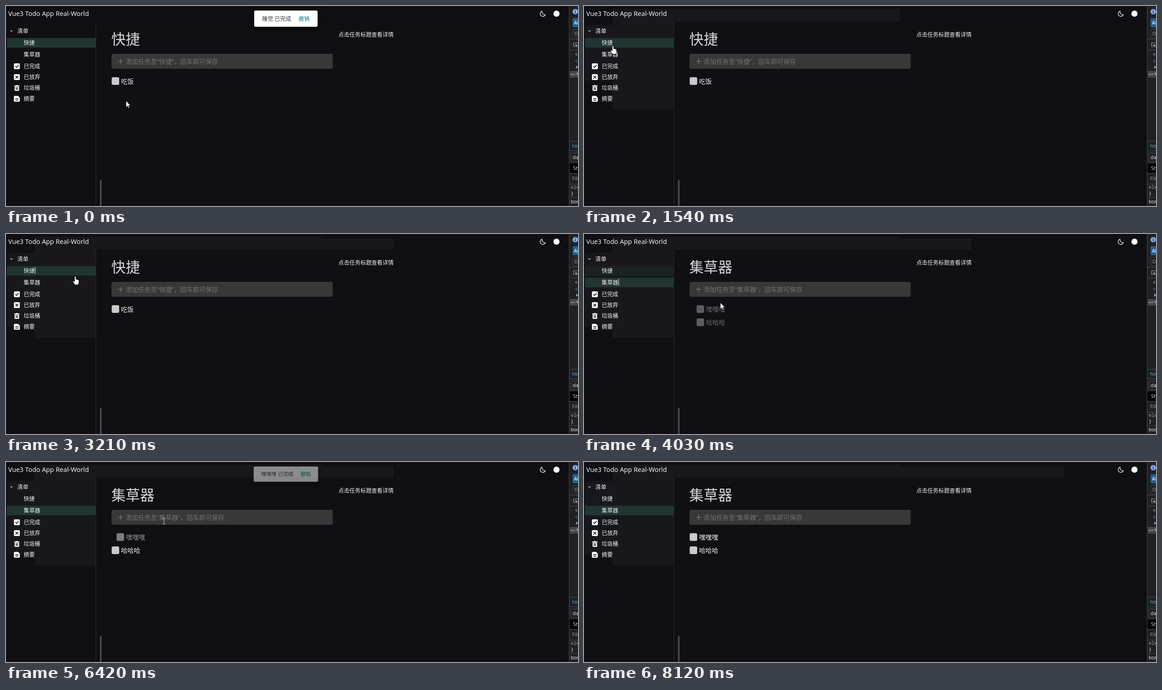
An HTML page that plays this animation: 1263 px wide and 443 px high, repeating every 8.22 s.

```html
<!DOCTYPE html>
<html lang="zh-CN">
<head>
<meta charset="utf-8">
<title>Todo App</title>
<style>
  html, body { margin: 0; width: 100%; height: 100%; overflow: hidden; background: #101014; }
  svg { display: block; width: 1263px; height: 443px; }
  text { font: 12.2px "Open Sans", "Noto Sans CJK SC", "Noto Sans CJK", sans-serif; fill: #f2f2f2; white-space: pre; }
  .brand { font-size: 14.4px; font-weight: 500; fill: #fff; }
  .title { font-size: 31.7px; fill: #d8d8d9; }
  .hint { font-size: 13.9px; fill: #727272; }
  .task text { font-size: 14.1px; }
  .task rect { fill: #cacaca; }
  .tone { fill: #18181c; }
  .sel { fill: #213632; }
  .toast text { fill: #3a3c40; }
  .toast .undo { fill: #0b7f80; }
  .toast rect { fill: #fff; filter: drop-shadow(0 5px 7px rgba(0, 0, 0, .5)); }
  .icon { fill: #fff; }
  .cut { fill: none; stroke: #101014; stroke-width: 1.6; }
  .tools text { font-size: 11px; fill: #e8eaed; }
  .tools .mono { font: 10.5px "Noto Sans Mono", "DejaVu Sans Mono", monospace; }
  .tools .blue { fill: #5db0d7; }
  .tools .gray { fill: #9aa0a6; }
  .rule { stroke: #494c50; fill: none; }
  .pointer { fill: #fff; stroke: #000; stroke-width: .8; stroke-linejoin: round; }
</style>
</head>
<body>
<svg viewBox="0 0 1263 443">
  <rect width="1263" height="443" fill="#101014"/>
  <!-- lighter panels, each shown from a given beat -->
  <path class="tone" data-from="3" d="M63 6H698V34H198V230H63z"/>
  <path class="tone" data-from="6" d="M2 42H63V165H2z"/>
  <path class="tone" data-from="15" d="M2 165H63V204H2z"/>
  <path class="tone" data-from="20" d="M698 10H856V34H698z"/>
  <path class="tone" data-from="52" d="M856 10H1061V34H856z"/>
  <path d="M198.500 34V443" stroke="#2b2b2e"/>
  <rect x="207.5" y="385" width="3.5" height="70" rx="1.7" fill="#4b4b4d"/>

  <g id="rows"></g>
  <text class="brand" x="5" y="22">Vue3 Todo App Real-World</text>
  <path d="M8.500 54h7l-3.500 4z" fill="#8a8a8c"/>
  <text x="25" y="59.6">清单</text>
  <path id="caret" stroke="#fff"/>

  <g class="icon">
    <rect x="17.5" y="127" width="13" height="13" rx="2"/>
    <rect x="17.5" y="151" width="13" height="13" rx="2"/>
    <path d="M18 176h3.500l1-1h3l1 1H30v1.800H18zM19 178.500h10v8q0 1.500-1.500 1.500h-7q-1.500 0-1.500-1.500z"/>
    <path d="M19.500 199h7l4 4v7.500q0 1.500-1.500 1.500h-10q-1.500 0-1.500-1.500v-9.500q0-2 2-2z"/>
  </g>
  <path class="cut" d="M20.500 133.500l2.600 2.600 4.700-5M21 154.500l6 6m0-6l-6 6M22.500 180v6m3-6v6M20.500 205h7M20.500 208.500h7"/>

  <path d="M1183.500 11.300A6 6 0 1 0 1191 19.300A7 7 0 0 1 1183.500 11.300z" fill="none" stroke="#f2f2f2" stroke-width="1.3"/>
  <circle cx="1215.5" cy="17" r="6.8" fill="#fff"/>

  <text class="title" id="title" x="232.5" y="84.8"></text>
  <rect x="233" y="106" width="488.5" height="33" rx="4" fill="#383838"/>
  <path d="M247.500 122.500h11m-5.500-5.500v11" stroke="#858585" stroke-width="1.2"/>
  <text class="hint" id="hint" x="264" y="128"></text>
  <text x="734" y="67.800">点击任务标题查看详情</text>

  <g id="tasks"></g>

  <g class="toast" id="toast">
    <rect id="card" y="10" height="36" rx="3"/>
    <text id="msg" y="32.7"></text>
    <text class="undo" id="undo" y="32.7">撤销</text>
  </g>

  <g class="tools">
    <rect x="1244" width="19" height="443" fill="#202124"/>
    <rect x="1244" y="348" width="19" height="22" fill="#000"/>
    <rect x="1245" y="144" width="18" height="14.5" fill="#46484b"/>
    <path class="rule" d="M1243.500 0V443M1244 73.500h19m-19 24h19m-19 202h19m-19 21h19m-19 27h19m-19 23h19m-19 24h19m-19 30h19"/>
    <circle cx="1257" cy="12.5" r="6" fill="#7cacf8"/>
    <path d="M1257 11.500v4.500m0-7.500v1.500" stroke="#202124" stroke-width="1.6"/>
    <rect x="1251" y="27" width="30" height="20" rx="3" fill="#1a639b"/>
    <text x="1254" y="41" style="font-weight:600">All</text>
    <rect class="rule" x="1251.5" y="51.5" width="30" height="19" rx="3"/>
    <text class="gray" x="1255" y="65">Default</text>
    <path d="M1256 90h-2.500v-8.500h10" fill="none" stroke="#9aa0a6" stroke-width="1.2"/>
    <path d="M1257 84.500l6 2.500-2.500 1 2 3-1.200.8-2-3-2 2z" fill="#9aa0a6"/>
    <text class="mono" x="1256" y="111">&lt;!DOCTYPE html&gt;</text>
    <text class="mono blue" x="1256" y="126">&lt;html&gt;</text>
    <path d="M1259 132l4.500 3.500-4.500 3.500zM1258.500 148.500h7l-3.500 5z" fill="#9aa0a6"/>
    <path d="M1247 151.500h9" stroke="#c4c7ca" stroke-width="1.8" stroke-dasharray="1.8"/>
    <text class="blue" x="1250" y="314">html</text>
    <rect class="rule" x="1247.5" y="325.5" width="30" height="19" rx="2"/>
    <text x="1251" y="338.5">dark</text>
    <text x="1252" y="363">Styles</text>
    <text class="gray" x="1250" y="386">Filter</text>
    <text class="mono gray" x="1247" y="405">element.style {</text>
    <text class="mono" x="1247" y="419">}</text>
    <text class="mono" x="1247" y="437">body {</text>
  </g>

  <g id="cursor">
    <path class="pointer" id="arrow" d="M0 0V14.500L3.400 11.300 5.700 16.400 7.800 15.500 5.600 10.500H10z"/>
    <path class="pointer" id="hand" d="M-1.600 1.500Q-1.600 0 0 0T1.600 1.500V6.500Q3.600 5.600 4.200 7.200Q6 6.600 6.400 8Q8 7.600 8 9.500V13Q8 16 6 18.500H-1Q-2 16.500-4.600 13Q-6 10.800-4.500 10Q-3.200 9.600-1.600 11.500z"/>
    <path id="beam" d="M-3-6.500H-1L0-5.500 1-6.500H3M0-5.500V5.500M-3 6.500H-1L0 5.500 1 6.500H3" fill="none" stroke="#d0d0d0"/>
  </g>
</svg>
<script>
// The screen refreshes once per beat; all times below are in beats.
const LOOP = 8220, BEATS = 59, BEAT = LOOP / BEATS;
const SWITCH = 28, TASK_FADE = 2.4, TOAST_FADE = 1.7, BLINK = 4;

const LISTS = [
  { name: "快捷", start: -9, focus: 12, blur: SWITCH },
  { name: "集草器", start: SWITCH, focus: SWITCH, blur: 45 }
];
// Each task is ticked off at `done` and restored at `undo`; a toast shows in between.
const TASKS = [
  { name: "睡觉", list: null, done: -9, undo: 4 },
  { name: "吃饭", list: LISTS[0], done: 13, undo: 17 },
  { name: "嘿嘿嘿", list: LISTS[1], done: 45, undo: 49 },
  { name: "哈哈哈", list: LISTS[1], done: Infinity, undo: Infinity }
];
// Where the mouse turns or rests: beat, x, y
const STOPS = [
  [1, 265, 210], [7, 139, 144], [12, 55, 82], [13, 241, 167], [15, 585, 52], [17, 658, 28],
  [25, 60, 106], [28, 60, 106], [29, 301, 152], [33, 405, 166], [36, 405, 166], [38, 426, 92],
  [41, 262, 172], [44, 241, 167], [45, 241, 167], [48, 658, 28], [49, 658, 28],
  [50, 658, 127], [55, 1165, 460]
];

const $ = id => document.getElementById(id);
const clamp = v => Math.max(0, Math.min(1, v));
const ease = k => k * k * (3 - 2 * k);
const show = (el, on) => { el.style.display = on ? "" : "none"; };
const set = (el, attrs) => { for (const k in attrs) el.setAttribute(k, attrs[k]); };
function add(parent, tag, attrs) {
  const el = document.createElementNS("http://www.w3.org/2000/svg", tag);
  set(el, attrs);
  return parent.appendChild(el);
}

const rows = ["快捷", "集草器", "已完成", "已放弃", "垃圾桶", "摘要"].map((name, i) => {
  const isList = i < LISTS.length;
  const y = isList ? 71 + 26 * i : 74 + 24 * i;
  const height = isList ? 21 : 24;
  const box = { x: 2, y, width: 196.5, height };
  const hover = add($("rows"), "rect", { ...box, fill: "#2b2b2e" });
  if (isList) LISTS[i].bar = add($("rows"), "rect", { ...box, class: "sel" });
  add($("rows"), "text", { x: 39, y: y + height / 2 + 4.2 }).textContent = name;
  return { y, height, hover };
});

const shown = TASKS.filter(task => task.list);
for (const task of shown) {
  task.el = add($("tasks"), "g", { class: "task" });
  add(task.el, "rect", { x: 233.4, y: 157.7, width: 16.5, height: 17, rx: 3 });
  add(task.el, "text", { x: 254, y: 172 }).textContent = task.name;
}

function mouseAt(b) {
  const i = STOPS.findIndex(stop => stop[0] > b);
  if (i < 1) return STOPS.at(i).slice(1);
  const [b0, x0, y0] = STOPS[i - 1], [b1, x1, y1] = STOPS[i];
  const k = ease((b - b0) / (b1 - b0));
  return [x0 + (x1 - x0) * k, y0 + (y1 - y0) * k];
}

function drawLists(b, current) {
  $("title").textContent = current.name;
  $("hint").textContent = `添加任务至“${current.name}”，回车即可保存`;
  set(LISTS[0].bar, { opacity: 1 - clamp((b - SWITCH) / 1.5) });
  show(LISTS[1].bar, current === LISTS[1]);

  const { focus, blur, name } = current, i = LISTS.indexOf(current);
  show($("caret"), b >= focus && b < blur && Math.floor((b - focus) / BLINK) % 2 === 0);
  set($("caret"), { d: `M${40 + 12.2 * name.length} ${73 + 26 * i}v15` });
}

function drawTasks(b, current) {
  let row = 0;
  for (const { el, list, done, undo } of shown) {
    const ramp = start => clamp((b - start) / TASK_FADE);
    const p = list === current ? Math.min(ramp(list.start), Math.max(1 - ramp(done), ramp(undo))) : 0;
    show(el, p > 0);
    set(el, { opacity: p, transform: `translate(${26 * (1 - p)} ${29.3 * row})` });
    if (p > 0) row++;
  }
}

function drawToast(b) {
  const task = TASKS.find(({ done, undo }) => b > done && b < undo + TOAST_FADE);
  show($("toast"), task);
  if (!task) return false;
  const ramp = start => clamp((b - start) / TOAST_FADE);
  const p = Math.min(ramp(task.done), 1 - ramp(task.undo));
  const width = 115.4 + 12.3 * task.name.length, x = 618 - width / 2;
  set($("card"), { x, width });
  set($("msg"), { x: x + 17.5 });
  set($("undo"), { x: x + width - 42 });
  $("msg").textContent = task.name + " 已完成";
  const transform = `translate(618 10) scale(${.84 + .16 * p}) translate(-618 -10)`;
  set($("toast"), { opacity: p ** 1.3, transform });
  return true;
}

function drawMouse(b, toastOn) {
  const [x, y] = mouseAt(b);
  const inside = (left, top, right, bottom) => x >= left && x <= right && y >= top && y <= bottom;
  const hand = inside(2, 45, 198, 218) || inside(233, 157, 296, 176) || (toastOn && inside(644, 18, 672, 38));
  const beam = inside(233, 106, 721, 139);
  show($("hand"), hand);
  show($("beam"), beam);
  show($("arrow"), !hand && !beam);
  set($("cursor"), { transform: `translate(${Math.round(x)} ${Math.round(y)})` });
  for (const row of rows) show(row.hover, inside(2, row.y, 198, row.y + row.height));
}

function draw(time) {
  // the small lead absorbs uneven refreshes
  const b = Math.min(BEATS - 1, Math.floor((time + 25) / BEAT));
  const current = LISTS[b < SWITCH ? 0 : 1];
  for (const el of document.querySelectorAll("[data-from]")) show(el, b >= el.dataset.from);
  drawLists(b, current);
  drawTasks(b, current);
  drawMouse(b, drawToast(b));
}

const begin = performance.now();
function tick() {
  draw((performance.now() - begin) % LOOP);
  requestAnimationFrame(tick);
}
tick();
</script>
</body>
</html>
```
